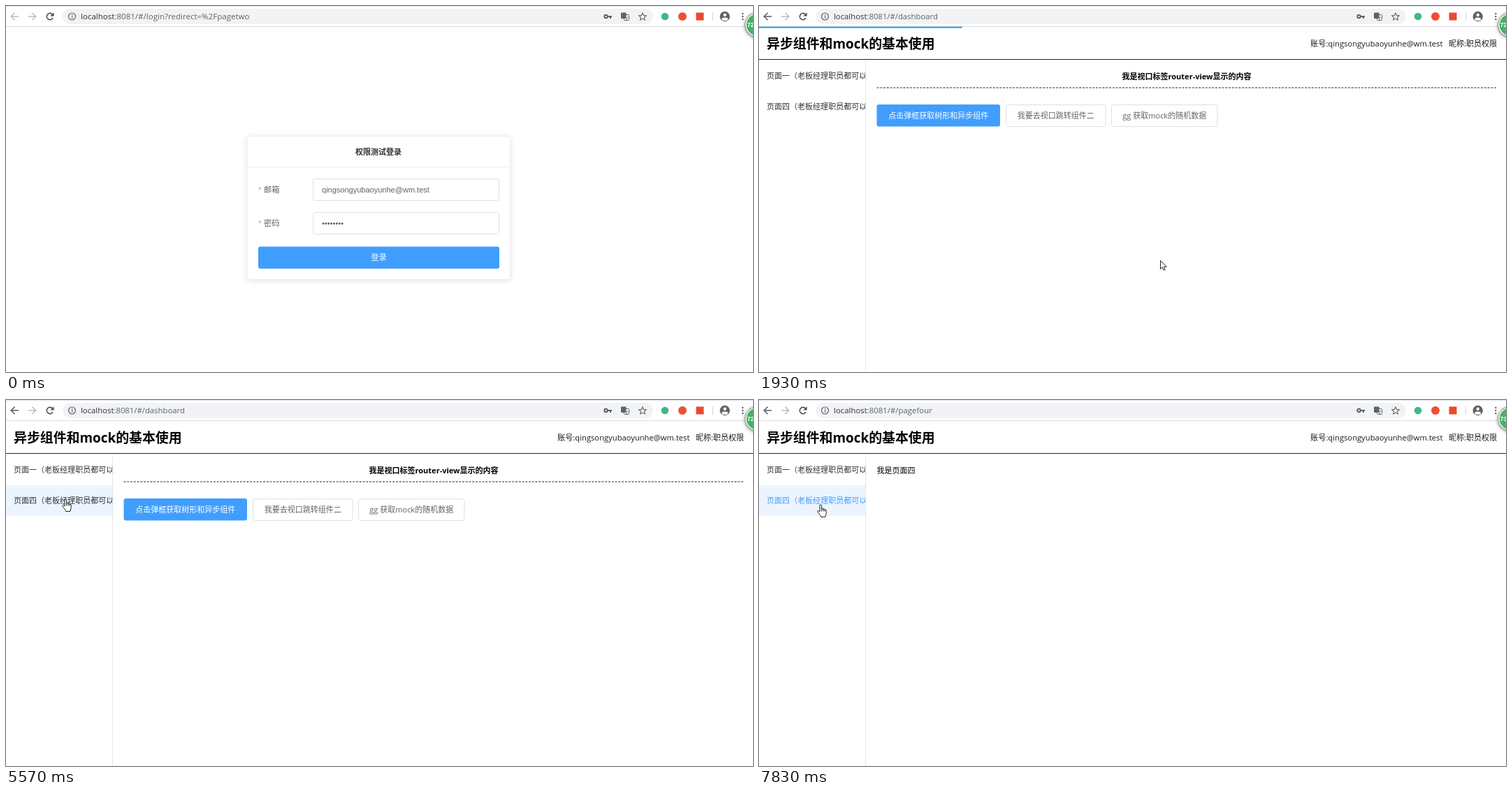
Write an HTML page with a canvas that moves like this. It is 1069 by 524 pixels and loops after 8000 ms.

```html
<!DOCTYPE html>
<html lang="zh-CN">
<head>
<meta charset="utf-8">
<title>权限测试</title>
<style>
html, body { margin: 0; width: 100%; height: 100%; overflow: hidden; background: #fff; }
canvas { display: block; }
</style>
</head>
<body>
<canvas id="stage" width="1069" height="524"></canvas>
<script>
const W = 1069, H = 524, LOOP = 8000;
const ctx = document.getElementById('stage').getContext('2d', { alpha: false });
const UI = '"Open Sans", "Noto Sans CJK SC", "Noto Sans CJK", sans-serif';
const ARIAL = '"Liberation Sans", "Noto Sans CJK SC", sans-serif';
const EMAIL = 'qingsongyubaoyunhe@wm.test';
const BLUE = '#409eff', GREY = '#5f6368';

const ARROW = new Path2D('M.5 .5V12.6L3.3 10L5.2 14.4L7.2 13.5L5.3 9.3H9.2Z');
const HAND = new Path2D('M4 11V2.2a1.3 1.3 0 0 1 2.6 0V7.2c0-1.4 2.4-1.4 2.4 0v.6c0-1.3 2.2-1.2 2.2 .2v.7c0-1.2 2-1 2 .5V13.5c0 2-1.4 3-1.4 5H5.6C5.4 16 2.5 13.6 1 11.2C.2 9.8 1.7 8.6 2.8 9.8Z');
const FINGERS = new Path2D('M6.6 7V10.5M9 7.5V10.5M11.2 8.3V10.5');
const STAR = new Path2D('M911 10L912.6 13.4L916.3 13.8L913.5 16.3L914.3 20L911 18.1L907.7 20L908.5 16.3L905.7 13.8L909.4 13.4Z');

// Pointer tip: time, x, y
const TRACK = [
  [220, 740, 479], [700, 612, 402], [1000, 572, 367], [1610, 572, 367], [1690, 574, 364],
  [2480, 574, 364], [2860, 800, 190], [3250, 1043, 62], [3320, 1043, 62], [3940, 777, 49],
  [4090, 777, 50], [4730, 1057, 67], [4970, 1057, 67], [5410, 85, 133], [5500, 85, 133],
  [5570, 85, 141], [5640, 84, 143], [5790, 84, 143], [6060, 86, 148], [6420, 86, 108],
  [6740, 86, 106], [6980, 88, 134], [7130, 88, 149], [8000, 88, 149]
];
const LOAD = [[1690, 620], [5830, 460], [6660, 400], [7340, 440]];
const BADGE = [[0, 72], [610, 71], [1300, 72], [3620, 73], [5120, 72], [6200, 73]];

const clamp = v => Math.max(0, Math.min(1, v));
const ramp = (t, a, b) => clamp((t - a) / (b - a));

function pointer(t) {
  const i = TRACK.findIndex(k => k[0] > t);
  if (i < 1) return null;
  const [a, x, y] = TRACK[i - 1], [b, x2, y2] = TRACK[i];
  const u = ramp(t, a, b);
  return [Math.round(x + (x2 - x) * u), Math.round(y + (y2 - y) * u)];
}

function text(s, x, y, color, { size = 11.03, bold = false, font = UI, align = 'left' } = {}) {
  ctx.font = (bold ? 'bold ' : '') + size + 'px ' + font;
  ctx.textAlign = align;
  ctx.fillStyle = color;
  ctx.fillText(s, x, y);
  return ctx.measureText(s).width;
}

function rect(x, y, w, h, color) {
  ctx.fillStyle = color;
  ctx.fillRect(x, y, w, h);
}

function box(x, y, w, h, r, fill, stroke) {
  ctx.beginPath();
  ctx.roundRect(x, y, w, h, r);
  if (fill) { ctx.fillStyle = fill; ctx.fill(); }
  if (stroke) { ctx.strokeStyle = stroke; ctx.lineWidth = 1; ctx.stroke(); }
}

function disc(x, y, r, color) {
  ctx.beginPath();
  ctx.arc(x, y, r, 0, 7);
  ctx.fillStyle = color;
  ctx.fill();
}

function line(color, width, ...pts) {
  ctx.beginPath();
  pts.forEach(([x, y], i) => i ? ctx.lineTo(x, y) : ctx.moveTo(x, y));
  ctx.strokeStyle = color;
  ctx.lineWidth = width;
  ctx.stroke();
}

function ring(x, y, r, color, width, a = 0, b = 7) {
  ctx.beginPath();
  ctx.arc(x, y, r, a, b);
  ctx.strokeStyle = color;
  ctx.lineWidth = width;
  ctx.stroke();
}

function arrow(x, dir, color) {
  line(color, 1.5, [x - dir * 5.5, 15], [x + dir * 5, 15]);
  line(color, 1.5, [x, 9.7], [x + dir * 5.3, 15], [x, 20.3]);
}

function browserBar(page) {
  rect(0, 0, W, 30, '#fff');
  rect(0, 0, W, 1, '#dee1e6');
  rect(0, 29, W, 1, '#dadce0');
  arrow(12.5, -1, page === 'login' ? '#babcbe' : '#55585c');
  arrow(37.5, 1, '#babcbe');
  ring(63, 15, 4.6, '#4a4d51', 1.6, 0.5, 5.5);
  ctx.fillStyle = '#4a4d51';
  ctx.fill(new Path2D('M68.6 9.2V14.4H63.4Z'));

  box(81, 4, 845, 22, 11, '#f1f3f4');
  ring(94.5, 15, 5, GREY, 1.2);
  rect(94, 14.2, 1.2, 3.6, GREY);
  rect(94, 12, 1.2, 1.3, GREY);
  const [path, size] = {
    login: ['login?redirect=%2Fpagetwo', 11.55],
    dashboard: ['dashboard', 11.32],
    pagefour: ['pagefour', 11.4]
  }[page];
  const w = text('localhost', 107, 19, '#303338', { size });
  text(':8081/#/' + path, 107 + w, 19, GREY, { size });

  // Key, translate, bookmark
  ring(858.5, 15, 2.2, GREY, 2);
  rect(861, 14, 6, 2, GREY);
  rect(864, 15, 2, 3, GREY);
  box(884.5, 12.5, 7, 8, 1, '#fff', GREY);
  text('文', 885, 19.5, GREY, { size: 6 });
  box(880, 9.5, 7.5, 8.5, 1, GREY);
  ctx.strokeStyle = GREY;
  ctx.lineWidth = 1.1;
  ctx.stroke(STAR);

  // Extensions
  disc(943, 15, 5.3, '#41b883');
  disc(968, 15, 6, '#ee4f32');
  rect(987.5, 9.5, 11, 11, '#ea4a30');
  rect(1011, 9, 1, 12, '#d3d5d8');

  disc(1028.7, 15, 7.2, GREY);
  disc(1028.7, 12.7, 2.2, '#fff');
  ctx.beginPath();
  ctx.ellipse(1028.7, 18.8, 4.4, 2.2, 0, 0, 7);
  ctx.fill();
  for (const y of [11, 15, 19]) disc(1054.3, y, 1.2, GREY);
}

function loginPage(t, tip) {
  ctx.save();
  ctx.shadowColor = 'rgba(0,0,0,.13)';
  ctx.shadowBlur = 9.5;
  ctx.shadowOffsetY = 1.6;
  box(345, 186.5, 376.5, 205, 3, '#fff');
  ctx.restore();
  box(345, 186.5, 376.5, 205, 3, null, '#ebeef5');
  rect(345, 230, 376, 1, '#e8ebf2');
  text('权限测试登录', 533, 213, '#303133', { bold: true, align: 'center' });

  [['邮箱', 247], ['密码', 295.5]].forEach(([label, y]) => {
    text('*', 361, y + 19.5, '#f08a6c', { font: ARIAL });
    text(label, 369, y + 19.5, '#606266', { size: 11.2 });
    box(439.5, Math.floor(y) + .5, 266, 31, 3, '#fff', '#dcdfe6');
  });
  text(EMAIL, 452, 266.5, '#606266', { font: ARIAL });
  for (let i = 0; i < 8; i++) disc(454 + i * 3.87, 311.5, 1.45, '#606266');

  const over = tip && tip[1] < 376;
  const pressed = t >= 1160 && t < 1310;
  box(361, 344.5, 345, 31.5, 3, pressed ? '#3a8ee6' : over ? '#66b1ff' : BLUE);
  text('登录', 533.5, 364, '#fff', { size: 11.3, align: 'center' });
}

function menuItem(label, y, glow, active) {
  ctx.save();
  ctx.globalAlpha = glow;
  rect(0, y, 152, 44, '#ecf5ff');
  ctx.restore();
  text(label + '（老板经理职员都可以看）', 11, y + 26.3, active ? BLUE : '#303133');
}

function button(label, x, w, primary) {
  if (primary) box(x, 141, w, 31.5, 3, BLUE);
  else box(x + .5, 141.5, w - 1, 31, 3, '#fff', '#dcdfe6');
  text(label, x + w / 2, 161, primary ? '#fff' : '#606266', { align: 'center' });
}

function appPage(t, page) {
  text('异步组件和mock的基本使用', 11, 61, '#000', { size: 18.9, bold: true });
  text('账号:' + EMAIL, 789, 57.5, '#1c1c1c', { size: 11.2 });
  text('昵称:职员权限', 987, 57.5, '#1c1c1c');
  rect(0, 76, W, 1, '#222');

  ctx.save();
  ctx.beginPath();
  ctx.rect(0, 77, 153.5, H);
  ctx.clip();
  menuItem('页面一', 78, ramp(t, 6330, 6500) - ramp(t, 7280, 7480), false);
  menuItem('页面四', 122,
    ramp(t, 5340, 5540) - ramp(t, 6300, 6500) + ramp(t, 7000, 7200), page === 'pagefour');
  ctx.restore();
  rect(152, 78, 1, H - 78, '#e4e6eb');

  if (page === 'pagefour') {
    text('我是页面四', 168.5, 104.5, '#000');
    return;
  }
  text('我是视口标签router-view显示的内容', 612, 104.8, '#000', { bold: true, align: 'center' });
  ctx.save();
  ctx.setLineDash([3, 1.75]);
  line('#222', 1, [168.5, 117], [1056, 117]);
  ctx.restore();
  button('点击弹框获取树形和异步组件', 168.5, 176.5, true);
  button('我要去视口跳转组件二', 353, 143.5);
  button('gg 获取mock的随机数据', 504, 152.5);
}

function progress(t) {
  for (const [start, length] of LOAD) {
    const u = (t - start) / length;
    if (u <= 0 || u >= .9) continue;
    const w = W * (u < .4 ? u * .7 : .28 + .72 * ramp(u, .4, .6));
    ctx.save();
    ctx.globalAlpha = 1 - ramp(u, .62, .9);
    rect(0, 29.6, w, 1.9, '#2299dd');
    ctx.restore();
  }
}

function badge(t) {
  const value = BADGE.filter(b => b[0] <= t).pop()[1];
  ctx.save();
  ctx.shadowColor = 'rgba(0,0,0,.55)';
  ctx.shadowBlur = 5;
  ctx.shadowOffsetY = 1;
  disc(1075, 27, 17.5, '#66756b');
  ctx.restore();
  disc(1075, 27, 17, '#f2f6f3');
  disc(1075, 27, 15.3, '#45b265');
  text(value, 1060.5, 30, '#fff', { size: 9, bold: true, font: ARIAL });
}

function drawPointer([x, y], hand) {
  ctx.save();
  ctx.translate(hand ? x - 5 : x, y);
  ctx.fillStyle = '#fff';
  ctx.strokeStyle = '#222';
  ctx.lineWidth = 1;
  ctx.lineJoin = 'round';
  ctx.fill(hand ? HAND : ARROW);
  ctx.stroke(hand ? HAND : ARROW);
  if (hand) ctx.stroke(FINGERS);
  ctx.restore();
}

function pageAt(t) {
  if (t < 1690) return 'login';
  return (t >= 5870 && t < 6740) || t >= 7380 ? 'pagefour' : 'dashboard';
}

function draw(t) {
  const page = pageAt(t), tip = pointer(t);
  rect(0, 0, W, H, '#fff');
  if (page === 'login') loginPage(t, tip);
  else appPage(t, page);
  browserBar(page);
  progress(t);
  badge(t);
  if (tip) {
    const hand = page === 'login' ? tip[1] < 376 : tip[0] < 152 && tip[1] > 78;
    drawPointer(tip, hand);
  }
}

const begin = performance.now();
function tick() {
  draw((performance.now() - begin) % LOOP);
  requestAnimationFrame(tick);
}
tick();
</script>
</body>
</html>
```
